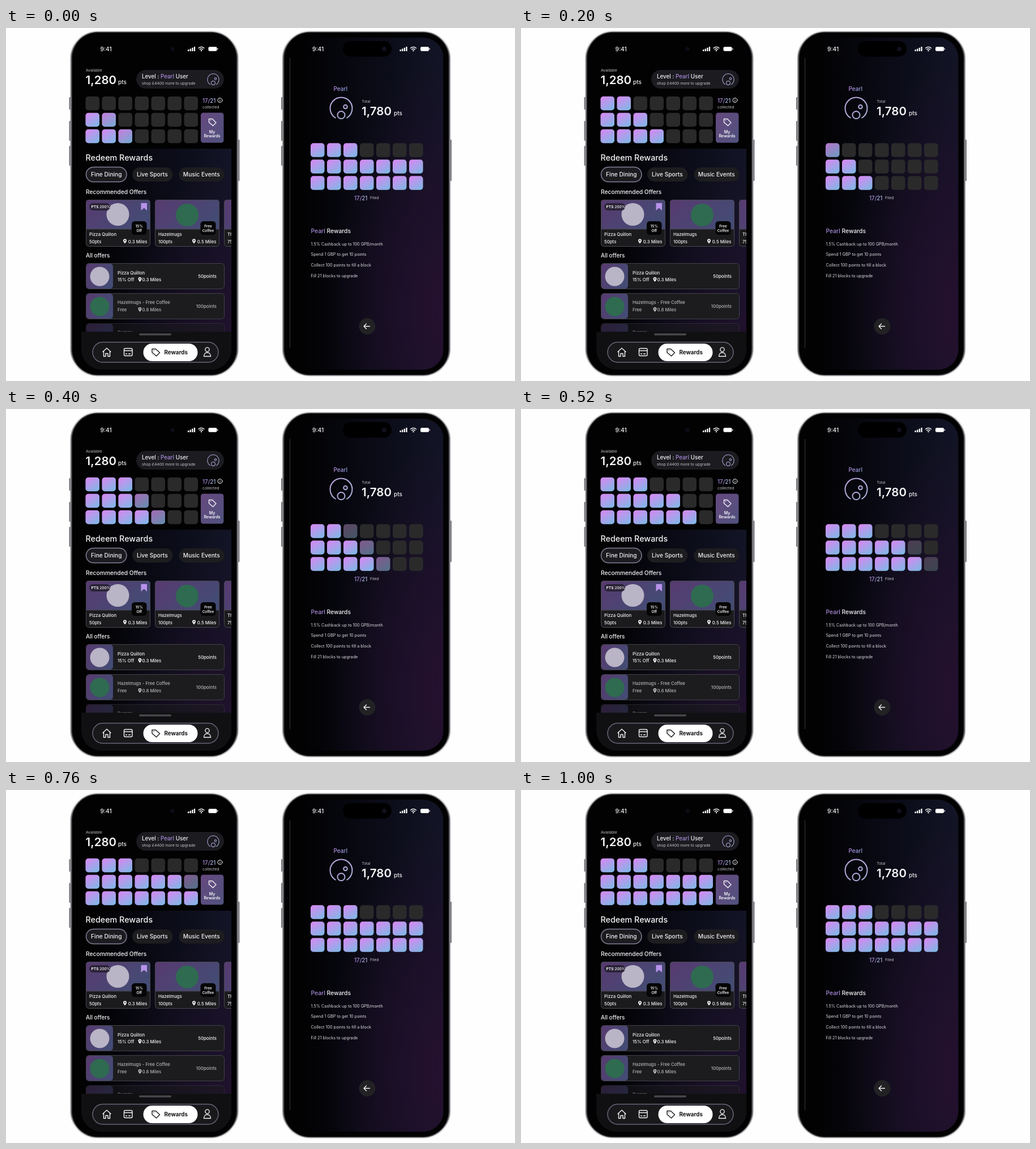
Animation of 899 by 623 pixels, one loop 1080 ms. Source, as an HTML page:

```html
<!DOCTYPE html>
<html lang="en">
<head>
<meta charset="utf-8">
<title>Rewards app</title>
<style>
  html, body { margin: 0; width: 100%; height: 100%; overflow: hidden; background: #fefefe; }
  svg { display: block; }
  text { font-family: Inter, "Open Sans", sans-serif; font-weight: 500; fill: #f4f4f6; }
  .big { font-size: 20.5px; font-weight: 600; }
  .pts { font-size: 10px; }
  .tiny { font-size: 6.8px; font-weight: 400; fill: #c4c4c8; }
  .sm { font-size: 7.8px; }
  .badge { font-size: 6.4px; font-weight: 600; text-anchor: middle; }
  .chip { font-size: 10.2px; text-anchor: middle; }
  .h { font-size: 10.3px; }
  .perk { font-size: 7.25px; font-weight: 400; fill: #dcdce0; }
  .end { text-anchor: end; }
  .dim text { fill: #b4b4b8; }
  .lilac { fill: #a98bd8; }
  .line { fill: none; stroke: #f4f4f6; stroke-width: 1.4; stroke-linecap: round; stroke-linejoin: round; }
</style>
</head>
<body>
<svg width="899" height="623" viewBox="0 0 899 623">
  <defs>
    <linearGradient id="cell" x1=".1" y1="0" x2=".75" y2="1">
      <stop offset=".1" stop-color="#d08cf0"/><stop offset="1" stop-color="#82b6e6"/>
    </linearGradient>
    <linearGradient id="pearl">
      <stop offset="0" stop-color="#b78be0"/><stop offset="1" stop-color="#8d9fdc"/>
    </linearGradient>
    <linearGradient id="ring" x1="0" y1="0" x2="1" y2="1">
      <stop offset="0" stop-color="#b9a0d8"/><stop offset="1" stop-color="#a9b4dc"/>
    </linearGradient>
    <linearGradient id="photo" x1="0" y1="0" x2="1" y2=".5">
      <stop offset="0" stop-color="#583a70"/><stop offset="1" stop-color="#444b74"/>
    </linearGradient>
    <linearGradient id="button" x1="0" y1="0" x2="1" y2="1">
      <stop offset="0" stop-color="#66497f"/><stop offset="1" stop-color="#50527e"/>
    </linearGradient>
    <linearGradient id="steel">
      <stop offset="0" stop-color="#8f8f93"/><stop offset=".03" stop-color="#d0d0d3"/>
      <stop offset=".97" stop-color="#d0d0d3"/><stop offset="1" stop-color="#8f8f93"/>
    </linearGradient>
    <linearGradient id="night">
      <stop offset=".1" stop-color="#020203"/><stop offset=".5" stop-color="#090a14"/>
      <stop offset="1" stop-color="#131426"/>
    </linearGradient>
    <radialGradient id="plum" cx="1" cy=".82" r=".75">
      <stop offset="0" stop-color="#25102f"/><stop offset="1" stop-color="#25102f" stop-opacity="0"/>
    </radialGradient>
    <clipPath id="screen"><rect x="126" y="17" width="272" height="586" rx="36"/></clipPath>
    <clipPath id="list"><rect x="126" y="213" width="272" height="323"/></clipPath>

    <g id="body">
      <g fill="#77777b">
        <rect x="111.5" y="122" width="3" height="22" rx="1"/>
        <rect x="111.5" y="164" width="3" height="35" rx="1"/>
        <rect x="111.5" y="208" width="3" height="35" rx="1"/>
        <rect x="409.5" y="197" width="3" height="73" rx="1"/>
      </g>
      <rect x="113.500" y="5" width="297" height="610" rx="48" fill="url(#steel)"/>
      <rect x="115.300" y="6.800" width="293.400" height="606.400" rx="46.500" fill="#3a3a3d"/>
      <rect x="117" y="8.300" width="290" height="603.400" rx="45" fill="#020203"/>
    </g>

    <g id="status">
      <text x="166.500" y="40.500" font-size="10.300">9:41</text>
      <g fill="#fff">
        <rect x="321" y="38" width="2.300" height="3" rx=".5"/>
        <rect x="324.600" y="36.500" width="2.300" height="4.500" rx=".5"/>
        <rect x="328.200" y="34.700" width="2.300" height="6.300" rx=".5"/>
        <rect x="331.800" y="33" width="2.300" height="8" rx=".5"/>
        <rect x="357.500" y="33.300" width="15" height="7.400" rx="2"/>
        <rect x="373.200" y="35.600" width="1.200" height="2.800" rx=".6"/>
        <circle cx="345" cy="40" r="1.200"/>
      </g>
      <path class="line" d="M340 35.500q5-4.200 10 0M342.200 37.900q2.800-2.300 5.600 0"/>
    </g>

    <g id="moon" fill="none" stroke="url(#ring)" stroke-width="2">
      <path d="M-9.500 17A19.500 19.500 0 1 1 9.500 17"/>
      <circle cy="11.500" r="6.500"/><circle cx="7.500" cy="-3" r="3.300"/>
    </g>
    <path id="tag" class="line" d="M-6-5.500h6L6.500 1 1 6.500-6 .500ZM-3-2.700h.1"/>
    <path id="pin" fill="#f0f0f2" fill-rule="evenodd" d="M0 4C-2 1.500-3-.0-3-1.300a3 3 0 0 1 6 0C3 0 2 1.500 0 4ZM0-2.400a1.100 1.100 0 1 0 .01 0Z"/>
    <g id="card">
      <rect width="114" height="83" rx="5" fill="#1b1b1e"/>
      <path d="M0 52V5a5 5 0 0 1 5-5h104a5 5 0 0 1 5 5v47Z" fill="url(#photo)"/>
      <rect x=".5" y=".5" width="113" height="82" rx="5" fill="none" stroke="#48484f"/>
      <path d="M0 52H114" stroke="#48484f"/>
    </g>
    <g id="row">
      <rect x=".5" y=".5" width="244" height="45" rx="5" fill="#1c1c1f" stroke="#424247"/>
      <rect x="1" y="1" width="47" height="44" rx="5" fill="url(#photo)"/>
    </g>
  </defs>

  <!-- Left phone -->
  <use href="#body"/>
  <g clip-path="url(#screen)">
    <rect x="126" y="17" width="272" height="586" fill="url(#night)"/>
    <rect x="126" y="213" width="272" height="390" fill="url(#plum)" opacity=".7"/>
    <path d="M126 17H398V213H126Z" fill="#020203"/>
  </g>
  <use href="#status"/>
  <circle cx="294" cy="37" r="3.500" fill="#0d0d18"/>

  <text class="tiny" x="141" y="76.500">Available</text>
  <text class="big" x="140.500" y="99">1,280</text>
  <text class="pts" x="198" y="99">pts</text>
  <rect x="230" y="74" width="155" height="33" rx="16.500" fill="#1b1b20"/>
  <text x="240" y="89" font-size="9.800">Level : <tspan class="lilac">Pearl</tspan> User</text>
  <text class="tiny" x="240" y="99.500">shop £4400 more to upgrade</text>
  <use href="#moon" transform="translate(366 91) scale(.52)"/>

  <g id="left"></g>
  <text x="347" y="131.500" font-size="9.800" font-weight="600"><tspan class="lilac">17/</tspan><tspan fill="#aab4dc">21</tspan></text>
  <circle cx="378" cy="127.500" r="4" class="line" style="stroke-width:1"/>
  <path class="line" style="stroke-width:1" d="M378 127.300v2M378 125.500v.1"/>
  <text class="tiny" x="347" y="141.500">collected</text>
  <rect x="344" y="149.500" width="40.500" height="53" rx="4.500" fill="url(#button)"/>
  <use href="#tag" x="364.500" y="166"/>
  <text class="badge" x="364" y="185.500" style="font-size:7px">My</text>
  <text class="badge" x="364" y="193" style="font-size:7px">Rewards</text>

  <text x="140.500" y="233.500" font-size="14.300">Redeem Rewards</text>
  <rect x="141.500" y="245.500" width="71.500" height="26" rx="13" fill="#1b1b20" stroke="#858098" stroke-width="1.500"/>
  <rect x="223" y="246" width="71.500" height="25" rx="12.500" fill="#1d1d20"/>
  <rect x="305.500" y="246" width="80" height="25" rx="12.500" fill="#1d1d20"/>
  <text class="chip" x="177.300" y="261.800">Fine Dining</text>
  <text class="chip" x="258.300" y="261.800">Live Sports</text>
  <text class="chip" x="345.300" y="261.800">Music Events</text>

  <text class="h" x="141" y="293">Recommended Offers</text>
  <g clip-path="url(#list)">
    <use href="#card" x="141" y="303"/>
    <use href="#card" x="263" y="303"/>
    <use href="#card" x="385" y="303"/>
    <circle cx="197.500" cy="329" r="20" fill="#b9b4c6"/>
    <circle cx="320" cy="330" r="20" fill="#2f6b50"/>
    <rect x="147" y="309" width="37" height="13" rx="6.500" fill="#2b2338"/>
    <text x="150.500" y="318" font-size="6.600"><tspan font-weight="700">PTS</tspan> 200%</text>
    <path d="M238.500 309h10.500v13l-5.250-4.500-5.250 4.500Z" fill="#b793ea"/>
    <rect x="222" y="341" width="26.500" height="24" rx="5.500" fill="#050506"/>
    <text class="badge" x="235.300" y="351.500">15%</text>
    <text class="badge" x="235.300" y="359.500">Off</text>
    <rect x="343.500" y="341" width="27" height="24" rx="5.500" fill="#050506"/>
    <text class="badge" x="357" y="351.500">Free</text>
    <text class="badge" x="357" y="359.500">Coffee</text>
    <g class="sm">
      <text x="147" y="367">Pizza Quillon</text>
      <text x="147" y="379.500">50pts</text>
      <text x="249.500" y="379.500" class="end">0.3 Miles</text>
      <text x="269" y="367">Hazelmugs</text>
      <text x="269" y="379.500">100pts</text>
      <text x="371.500" y="379.500" class="end">0.5 Miles</text>
      <text x="391" y="367">Th</text>
      <text x="391" y="379.500">75</text>
    </g>
    <use href="#pin" x="210" y="376.500"/>
    <use href="#pin" x="332" y="376.500"/>

    <text x="141" y="404.500" font-size="9.900">All offers</text>
    <use href="#row" x="141" y="415"/>
    <circle cx="165.500" cy="438.500" r="17" fill="#b9b4c6"/>
    <g class="sm">
      <text x="197" y="434.500">Pizza Quillon</text>
      <text x="197" y="447">15% Off</text>
      <text x="240.500" y="447">0.3 Miles</text>
      <text x="372" y="441" class="end" font-weight="600">50points</text>
    </g>
    <use href="#pin" x="236.500" y="444"/>
    <use href="#row" x="141" y="468"/>
    <circle cx="165.500" cy="491.500" r="17" fill="#2f6b50"/>
    <g class="sm dim">
      <text x="197" y="487">Hazelmugs - Free Coffee</text>
      <text x="197" y="500">Free</text>
      <text x="240.500" y="500">0.8 Miles</text>
      <text x="372" y="494" class="end">100points</text>
    </g>
    <use href="#pin" x="236.500" y="497" opacity=".75"/>
    <g opacity=".5">
      <use href="#row" x="141" y="521"/>
      <text class="sm" x="197" y="540">Burger</text>
    </g>
  </g>

  <path d="M133 536H398V567A36 36 0 0 1 362 603H168A36 36 0 0 1 133 567Z" fill="#101012"/>
  <rect x="235" y="539" width="57" height="3.500" rx="1.700" fill="#48484b"/>
  <rect x="153" y="554.500" width="222" height="35.500" rx="17.700" fill="#19191c" stroke="#686478" stroke-width="1.500"/>
  <rect x="242.500" y="557" width="96" height="31" rx="15.500" fill="#fff"/>
  <g class="line">
    <path d="M171 571.500l7-6.500 7 6.500M172.500 570.500v9h3.500v-5h4v5h3.500v-9"/>
    <rect x="208.500" y="565.500" width="14.500" height="13" rx="2"/>
    <path d="M208.500 569.500h14.500M211.500 575h2M216.500 575h3"/>
    <circle cx="355.500" cy="567.500" r="3.600"/>
    <path d="M349.500 579.500c0-9 12-9 12 0Z"/>
  </g>
  <path class="line" style="stroke:#17171a" d="M258 566.500h6.500l7 6.500-6 6-7.500-6.500ZM261 569.500h.1"/>
  <text x="279.500" y="576" font-size="9.800" style="font-weight:700;fill:#17171a">Rewards</text>

  <!-- Right phone -->
  <g transform="translate(374.500 0)">
    <use href="#body"/>
    <g clip-path="url(#screen)">
      <rect x="126" y="17" width="272" height="586" fill="url(#night)"/>
      <rect x="126" y="17" width="272" height="586" fill="url(#plum)"/>
    </g>
    <path d="M127 53V565" stroke="#38383d"/>
    <rect x="220.500" y="23" width="86" height="27.500" rx="13.700" fill="#000"/>
    <circle cx="293.500" cy="37" r="4" fill="#10101d"/>
    <use href="#status"/>
  </g>
  <text x="578.500" y="111" font-size="10" style="fill:url(#pearl)">Pearl</text>
  <use href="#moon" x="592" y="142"/>
  <text class="tiny" x="628.500" y="132" style="font-size:6.500px">Total</text>
  <text class="big" x="628" y="153.500">1,780</text>
  <text class="pts" x="685" y="153.500">pts</text>
  <g id="right"></g>
  <text x="615" y="303.500" font-size="9.800" font-weight="600"><tspan class="lilac">17/</tspan><tspan fill="#aab4dc">21</tspan></text>
  <text class="tiny" x="643" y="302">Filed</text>
  <text class="h" x="538.500" y="362"><tspan class="lilac">Pearl</tspan> Rewards</text>
  <text class="perk" x="538.500" y="383.500">1.5% Cashback up to 100 GPB/month</text>
  <text class="perk" x="538.500" y="402.300">Spend 1 GBP to get 10 points</text>
  <text class="perk" x="538.500" y="421">Collect 100 points to fill a block</text>
  <text class="perk" x="538.500" y="439.500">Fill 21 blocks to upgrade</text>
  <circle cx="638" cy="526.500" r="14.500" fill="#222225"/>
  <path class="line" d="M642.500 526.500h-10M636.500 522l-4.500 4.500 4.500 4.500"/>
</svg>
<script>
  const LOOP = 1080, STEP = 40, PITCH = 29, SIZE = 24.5;
  const CAPS = [3, 7, 7];

  // [time, number of filled blocks] for the bottom row; the rows above lag behind
  const LEFT = [[0, 2.9], [80, 2.9], [120, 3.2], [200, 4], [240, 4], [400, 4.7],
                [520, 6], [600, 6.6], [760, 7.5], [800, 8]];
  const LEFT_TOP = [[0, 0], [80, 0], [120, .7], [200, 2], [240, 2], [400, 3]];
  const RIGHT = [[0, 8], [80, 8], [120, 1.8], [200, 3], [240, 3], [400, 4.5],
                 [520, 6.2], [600, 6.7], [760, 8]];

  const clamp = v => Math.max(0, Math.min(1, v));

  function valueAt(keys, t) {
    const i = keys.findIndex(k => k[0] > t);
    if (i < 0) return keys[keys.length - 1][1];
    const [t0, a] = keys[i - 1], [t1, b] = keys[i];
    return a + (b - a) * (t - t0) / (t1 - t0);
  }

  function addRect(parent, x, y, fill) {
    const r = document.createElementNS("http://www.w3.org/2000/svg", "rect");
    const attrs = { x, y, width: SIZE, height: SIZE, rx: 5, fill };
    for (const name in attrs) r.setAttribute(name, attrs[name]);
    return parent.appendChild(r);
  }

  function buildGrid(id, x, y) {
    const group = document.getElementById(id);
    return CAPS.map((cap, row) => Array.from({ length: 7 }, (_, col) => {
      const at = [x + col * PITCH, y + row * PITCH];
      addRect(group, ...at, "#2a2a2b");
      return col < cap ? addRect(group, ...at, "url(#cell)") : null;
    }));
  }

  function fillGrid(grid, counts) {
    grid.forEach((row, r) => row.forEach((cell, col) => {
      if (cell) cell.setAttribute("opacity", clamp(counts[r] - col));
    }));
  }

  const left = buildGrid("left", 140.5, 120.7);
  const right = buildGrid("right", 538, 203.2);
  const start = performance.now();

  function draw() {
    const now = (performance.now() - start) % LOOP;
    const t = Math.floor(now / STEP) * STEP;
    const l = valueAt(LEFT, t), r = valueAt(RIGHT, t);
    fillGrid(left, [valueAt(LEFT_TOP, t), l - 1, l]);
    fillGrid(right, [r - 2.2, r - 1, r]);
    requestAnimationFrame(draw);
  }
  draw();
</script>
</body>
</html>
```
